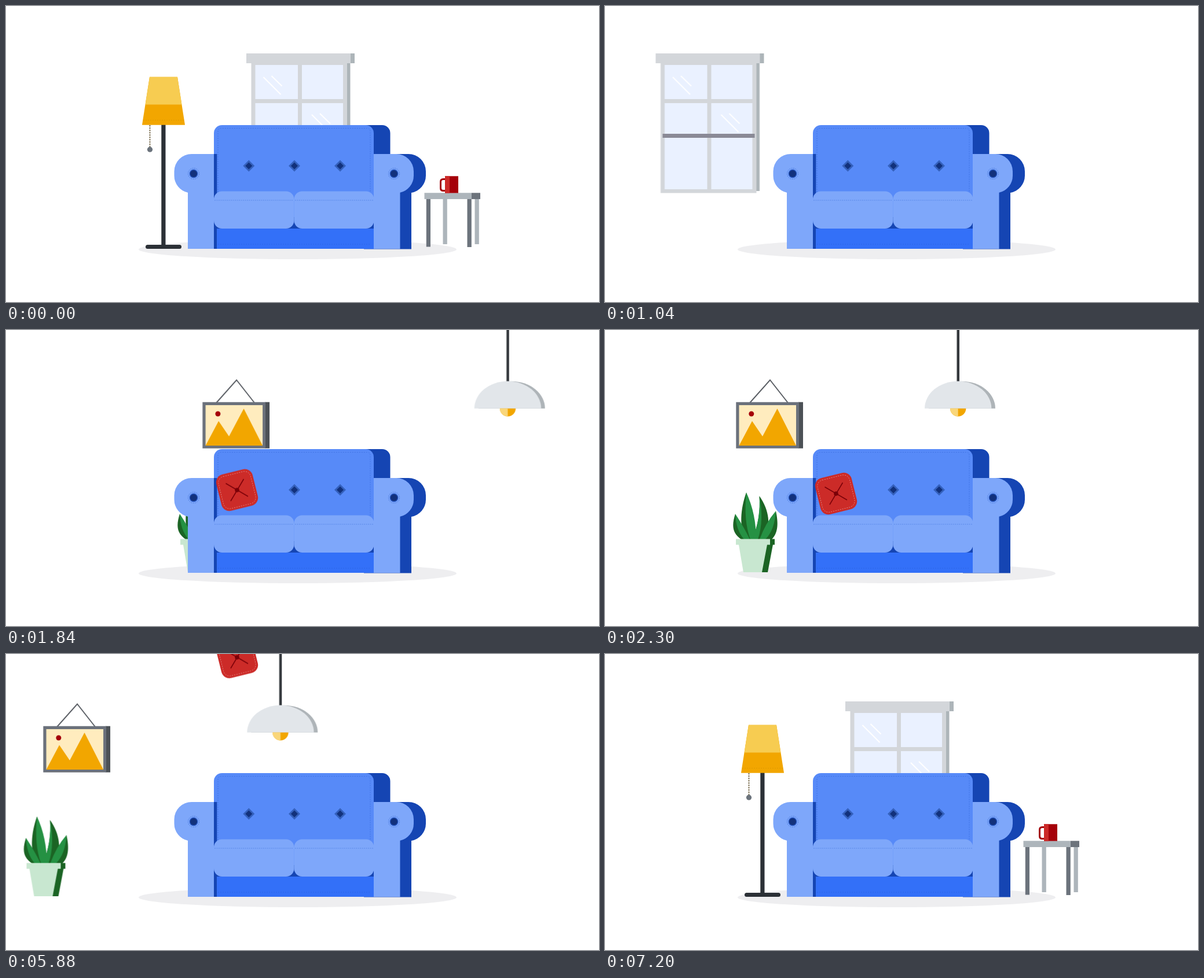
Write an HTML page without scripts that moves like this. It is 1024 by 512 pixels and loops after 9600 ms.

```html
<!DOCTYPE html>
<html lang="en">
<head>
<meta charset="utf-8">
<title>Living room</title>
<style>
html, body { margin: 0; width: 100%; height: 100%; overflow: hidden; background: #fff; }
svg { display: block; width: 100%; height: 100%; }

.move { animation: 9600ms linear infinite; }
.lamp { animation-name: lamp; }
.window { animation-name: window; }
.table { animation-name: table; }
.plant { animation-name: plant; }
.picture { animation-name: picture; }
.pendant { animation-name: pendant; }
.pillow { animation-name: pillow; }

/* Quadratic easing: (.3333, 0, .6667, .3333) speeds up, (.3333, .6667, .6667, 1) slows down. */

/* first set: leaves to the left, returns from the right */
@keyframes lamp {
  0% { transform: translateX(0); animation-timing-function: cubic-bezier(.3333, 0, .6667, .3333); }
  20.833% { transform: translateX(-1334px); animation-timing-function: step-end; }
  63.896% { transform: translateX(1240px); animation-timing-function: cubic-bezier(.3333, .6667, .6667, 1); }
  74.313%, 100% { transform: translateX(0); }
}
@keyframes window {
  0% { transform: translateX(0); }
  .521% { transform: translateX(0); animation-timing-function: cubic-bezier(.3333, 0, .6667, .3333); }
  21.354% { transform: translateX(-1334px); animation-timing-function: step-end; }
  64.583% { transform: translateX(1240px); animation-timing-function: cubic-bezier(.3333, .6667, .6667, 1); }
  75%, 100% { transform: translateX(0); }
}
@keyframes table {
  0% { transform: translateX(0); }
  1.042% { transform: translateX(0); animation-timing-function: cubic-bezier(.3333, 0, .6667, .3333); }
  21.875% { transform: translateX(-1334px); animation-timing-function: step-end; }
  64.583% { transform: translateX(1240px); animation-timing-function: cubic-bezier(.3333, .6667, .6667, 1); }
  75%, 100% { transform: translateX(0); }
}

/* second set: arrives from the right, leaves to the left */
@keyframes plant {
  0% { transform: translateX(1240px); }
  11.323% { transform: translateX(1240px); animation-timing-function: cubic-bezier(.3333, .6667, .6667, 1); }
  21.74% { transform: translateX(0); }
  54.583% { transform: translateX(0); animation-timing-function: cubic-bezier(.3333, 0, .6667, .3333); }
  72.292%, 100% { transform: translateX(-1340px); }
}
@keyframes picture {
  0% { transform: translateX(1240px); }
  11.906% { transform: translateX(1240px); animation-timing-function: cubic-bezier(.3333, .6667, .6667, 1); }
  22.323% { transform: translateX(0); }
  55.104% { transform: translateX(0); animation-timing-function: cubic-bezier(.3333, 0, .6667, .3333); }
  72.813%, 100% { transform: translateX(-1340px); }
}
@keyframes pendant {
  0% { transform: translateX(1240px); }
  13.5% { transform: translateX(1240px); animation-timing-function: cubic-bezier(.3333, .6667, .6667, 1); }
  23.917% { transform: translateX(0); }
  55.625% { transform: translateX(0); animation-timing-function: cubic-bezier(.3333, 0, .6667, .3333); }
  73.333%, 100% { transform: translateX(-1340px); }
}
@keyframes pillow {
  0% { transform: translateY(-432px); }
  13.677% { transform: translateY(-432px); animation-timing-function: cubic-bezier(.3333, .6667, .6667, 1); }
  19.927% { transform: translateY(0); }
  54.583% { transform: translateY(0); animation-timing-function: cubic-bezier(.3333, 0, .6667, .3333); }
  62.917%, 100% { transform: translateY(-432px); }
}
</style>
</head>
<body>
<svg viewBox="0 0 1024 512">
  <defs>
    <g id="tuft">
      <path d="M0-10 10 0 0 10-10 0Z" fill="#3561bd"/>
      <path d="M0-6 6 0 0 6-6 0Z" fill="#12317c"/>
    </g>
    <g id="stud">
      <circle r="9.5" fill="none" stroke="#4a7be0" stroke-dasharray="2 1.5"/>
      <circle r="7.4" fill="#2a5ac4"/>
      <circle r="6" fill="#12317c"/>
    </g>
    <path id="glint" d="M0 0 30 30M14-2 32 15.500" fill="none" stroke="#fff" stroke-width="2"/>
  </defs>

  <ellipse cx="503.500" cy="421" rx="274.500" ry="17" fill="#eeeef0"/>

  <g class="move window">
    <path d="M589 99h5.500v221h-5.500zM595 82h7v17h-7z" fill="#adb5b9"/>
    <path d="M415 82h180v17h-180zM423.500 99H589v224.500H423.500z" fill="#d3d6da"/>
    <path d="M430.500 102H504v59h-73.500zM511 102h71v59h-71zM430.500 168H504v53h-73.500zM511 168h71v53h-71zM430.500 228H504v89h-73.500zM511 228h71v89h-71z" fill="#eaf1ff"/>
    <path d="M427 221h159v7H427z" fill="#8a8a96"/>
    <use href="#glint" x="444.500" y="123"/>
    <use href="#glint" x="528" y="188"/>
  </g>

  <g class="move lamp">
    <path d="M268.300 205h7.200v210h-7.200z" fill="#2b3036"/>
    <rect x="241" y="413" width="62" height="7" rx="3.500" fill="#2b3036"/>
    <path d="M248.500 206v38" stroke="#54431c" stroke-width="1.500" stroke-dasharray="2.500 1.500"/>
    <circle cx="248.500" cy="248.200" r="4.600" fill="#6b737c"/>
    <path d="M248 122.700h48l13 83h-74z" fill="#f2a600"/>
    <path d="M248 122.700h48l7.500 47.800h-63z" fill="#f7cc51"/>
    <path d="M237 197.500h70" stroke="#dc9700" stroke-width=".8" stroke-dasharray="2 2"/>
  </g>

  <g class="move table">
    <path d="M754.500 334h7.300v78h-7.300zM809.500 334h7.300v78h-7.300zM722.500 323.300H804V334h-81.500z" fill="#adb5bb"/>
    <path d="M725.800 334h7.200v82.500h-7.200zM796.500 334h7.300v83h-7.300zM804 323.300h15V334h-15z" fill="#6c737c"/>
    <path d="M759 299.500h-4q-4.500 0-4.500 4.500v11q0 4.500 4.500 4.500h4" fill="none" stroke="#a50009" stroke-width="3"/>
    <path d="M758 294.300h23v29.200h-23z" fill="#a50009"/>
    <path d="M758 294.300h8v29.200h-8z" fill="#cc2a28"/>
  </g>

  <g class="move plant">
    <g fill="#1b6424">
      <path d="M225 318C219 337 219 351 235 362H250Q232 346 225 318Z"/>
      <path d="M244 281C234 309 231 343 244 362H260Q250 320 244 281Z"/>
      <path d="M266.500 287C284 312 287 339 275 362H254Q270 325 266.500 287Z"/>
      <path d="M295 313C299 332 300 350 288 362H268Q290 341 295 313Z"/>
    </g>
    <g fill="#259143">
      <path d="M225 318Q226 346 240 362H250Q240 341 225 318Z"/>
      <path d="M244 281Q239 330 251 362H261Q261 318 244 281Z"/>
      <path d="M266.500 287Q275 330 264 362H255Q269 325 266.500 287Z"/>
      <path d="M295 313Q293 346 277 362H267Q277 334 295 313Z"/>
    </g>
    <path d="M279 371h11l-9 48h-11zM285 361.500h8v10h-8z" fill="#1b6424"/>
    <path d="M226 361.500h59v10h-5l-9 47.500h-32l-8-47.500h-5z" fill="#c8e7d0"/>
  </g>

  <g class="move picture">
    <path d="M250 126 285 86.500 316 126" fill="none" stroke="#5b5f65" stroke-width="2"/>
    <path d="M334 124.700h8v80h-8z" fill="#4c5156"/>
    <path d="M226.300 124.700H335v80H226.300z" fill="#6b717b"/>
    <path d="M231.500 130H330v70h-98.500z" fill="#ffecbe"/>
    <path d="M231.500 200 254 157.500 272 184 297.500 136 330 200Z" fill="#f2a600"/>
    <circle cx="252.800" cy="145" r="4.500" fill="#a50009"/>
  </g>

  <g class="move pendant">
    <path d="M607.500 0h4.500v90h-4.500z" fill="#34383d"/>
    <path d="M559 135.700a57.500 47 0 0 1 115 0z" fill="#aeb4b8"/>
    <path d="M552 135.700a57.700 47.200 0 0 1 115.400 0z" fill="#e2e6ea"/>
    <path d="M596 135.700a13.700 13.700 0 0 0 27.400 0z" fill="#f2a600"/>
    <path d="M596 135.700a13.700 13.700 0 0 0 13.700 13.700V135.700z" fill="#f9d67a"/>
  </g>

  <g class="sofa">
    <path d="M618 206h31.500a14 14 0 0 1 14 14v36H695a30 30 0 0 1 30 30v7.500a30 30 0 0 1-25 29.500V420.600H618z" fill="#1545b3"/>
    <path d="M359 420V220a14 14 0 0 1 14-14h248a14 14 0 0 1 14 14V420z" fill="#578af8"/>
    <path d="M366 330V217q0-5.500 5.500-5.500h252q5.500 0 5.500 5.500V330" fill="none" stroke="#3f72e2" stroke-width=".9" stroke-dasharray="2 2"/>
    <path d="M359 256h5.300v164H359zM364 365h271v20H364z" fill="#1545b3"/>
    <path d="M364.300 385H635v35H364.300z" fill="#3370f8"/>
    <path d="M366 412h264" stroke="#2b62e2" stroke-width=".8" stroke-dasharray="2 2"/>
    <g fill="#7ea7fa">
      <path d="M359 256h-38.500a30 30 0 0 0-30 30v7.500a30 30 0 0 0 23.500 29.300V420h45z"/>
      <path d="M635 256h39a30 30 0 0 1 30 30v7.500a30 30 0 0 1-23.500 29.300V420H635z"/>
      <rect x="359" y="320.500" width="138.500" height="64.500" rx="14"/>
      <rect x="497.500" y="320.500" width="138" height="64.500" rx="14"/>
    </g>
    <path d="M360 336h136M499 336h135" stroke="#5585e6" stroke-width=".9" stroke-dasharray="2 1.500"/>
    <use href="#tuft" x="419.300" y="276.500"/>
    <use href="#tuft" x="498" y="276.500"/>
    <use href="#tuft" x="577" y="276.500"/>
    <use href="#stud" x="324" y="290"/>
    <use href="#stud" x="670" y="290"/>
  </g>

  <g class="move pillow">
    <g transform="translate(399 283) rotate(-14)">
      <rect x="-32.300" y="-32.300" width="64.600" height="64.600" rx="14" fill="#cc2b28"/>
      <rect x="-28.500" y="-28.500" width="57" height="57" rx="11" fill="none" stroke="#e8817c" stroke-width=".9" stroke-dasharray="2 2"/>
    </g>
    <path d="M379.500 271.500 418 294M410.500 264 388 302" stroke="#7a0008" stroke-width="1.500"/>
    <circle cx="399" cy="283" r="3.800" fill="#7a0008"/>
  </g>
</svg>
</body>
</html>
```
